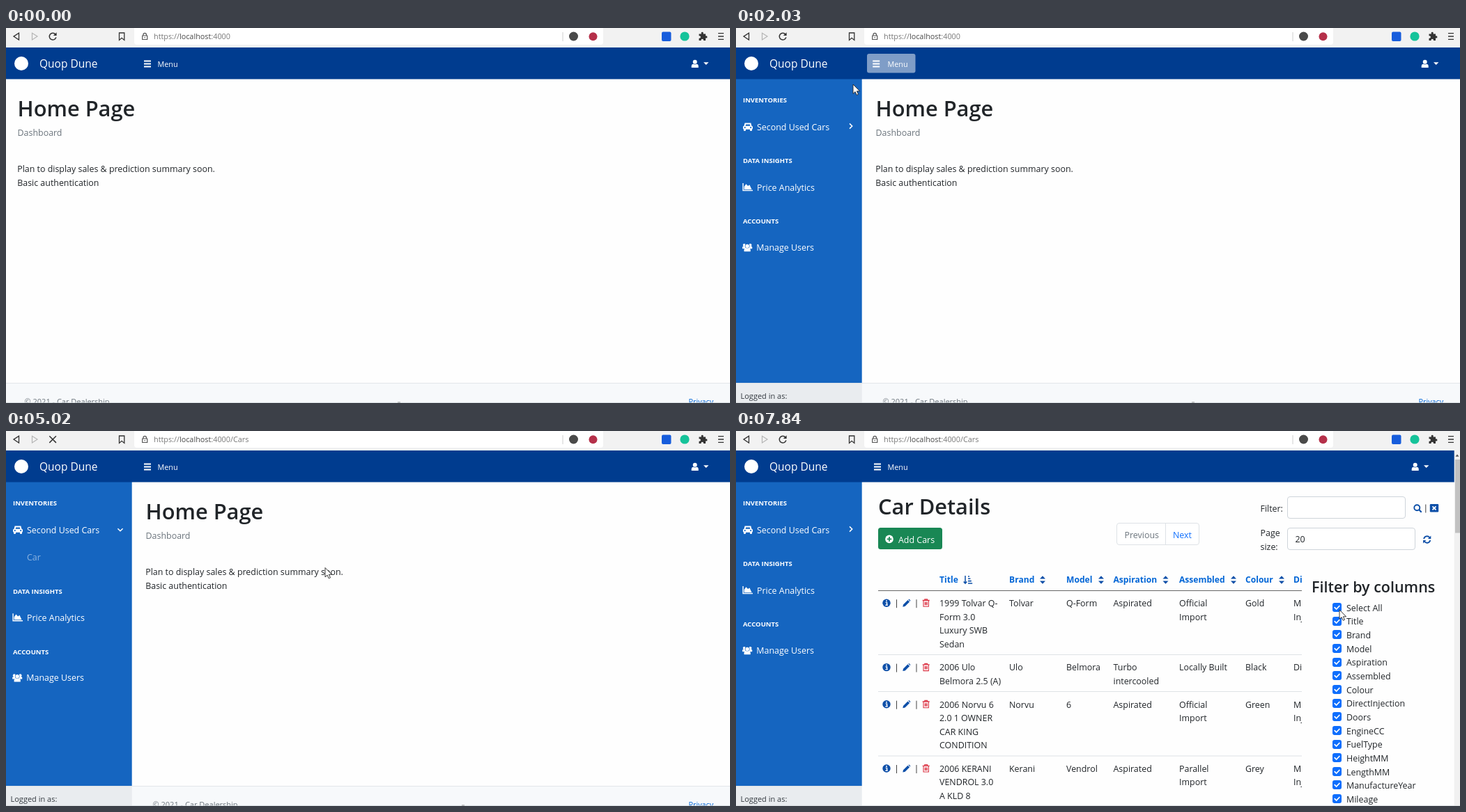
Write an HTML page that moves like this. It is 1039 by 539 pixels and loops after 8 s.

```html
<!DOCTYPE html>
<html lang="en">
<head>
<meta charset="utf-8">
<title>Car dealership dashboard</title>
<style>
html, body { margin: 0; width: 100%; height: 100%; overflow: hidden; background: #fefefe; }
svg { display: block; width: 1039px; height: 539px; font: 12.43px "Open Sans", "Noto Sans", sans-serif; }
text { white-space: pre; }
.off { display: none; }
.bare .fa { visibility: hidden; }
.dim { opacity: .5; }
</style>
</head>
<body>
<svg id="stage" viewBox="0 0 1039 539" xmlns="http://www.w3.org/2000/svg"></svg>
<script>
const INK = '#212529', GREY = '#6c757d', NAVY = '#003c8f', BLUE = '#1565c0',
  LINK = '#0366d6', ICON = '#0d4fa8', RED = '#dc3545', BODY = 12.43;

// Drawing helpers, all returning markup
const text = (x, y, s, fill = INK, size = BODY, weight = 400) =>
  `<text x="${x}" y="${y}" fill="${fill}" font-size="${size}" font-weight="${weight}">${s.replace(/&/g, '&amp;')}</text>`;
const rect = (x, y, w, h, fill, r = 0, stroke = 'none') =>
  `<rect x="${x}" y="${y}" width="${w}" height="${h}" rx="${r}" fill="${fill}" stroke="${stroke}"/>`;
const circle = (x, y, r, fill) => `<circle cx="${x}" cy="${y}" r="${r}" fill="${fill}"/>`;
const fill = (d, c) => `<path d="${d}" fill="${c}"/>`;
const line = (d, c, w = 1, extra = '') => `<path d="${d}" fill="none" stroke="${c}" stroke-width="${w}" ${extra}/>`;
const group = (attrs, ...parts) => `<g ${attrs}>${parts.join('')}</g>`;
const icon = (x, y, ...parts) => group(`class="fa" transform="translate(${x} ${y})"`, ...parts);
const pointer = d => `<path d="${d}" fill="#fff" stroke="#222" stroke-width=".9"/>`;

// Icons, centred on the given point
const bars = (x, y) => icon(x, y, line('M-5-4H5M-5 0H5M-5 4H5', '#fff', 1.8));
const user = (x, y) => icon(x, y, circle(0, -2.7, 3, '#fff'),
  fill('M-5 5.5V3.5Q-5 .3-2 .3Q0 1.6 2 .3Q5 .3 5 3.5V5.5Z', '#fff'));
const carIcon = (x, y) => icon(x, y,
  line('M-4.6-.5L-3.6-4.4H3.6L4.6-.5', '#fff', 2),
  rect(-7, -1.3, 14, 5, '#fff', 1.6), rect(-6, 2, 3, 4, '#fff', 1), rect(3, 2, 3, 4, '#fff', 1),
  circle(-4.2, 1.1, 1.1, BLUE), circle(4.2, 1.1, 1.1, BLUE));
const chart = (x, y) => icon(x, y, line('M-6.4-5.5V5H7.5', '#fff', 1.4),
  fill('M-4.8 3.4V-.5L-2-4.2L.6-1.4L3-3L6 3.4Z', '#fff'));
const people = (x, y) => icon(x, y, circle(-4.3, -3.2, 2, '#fff'), circle(4.3, -3.2, 2, '#fff'),
  fill('M-7 2V0Q-7-1.6-5-1.6H5Q7-1.6 7 0V2Z', '#fff'),
  circle(0, -1.8, 3.3, BLUE), circle(0, -1.8, 2.7, '#fff'),
  fill('M-4.6 6V4Q-4.6 1.2-2 1.2H2Q4.6 1.2 4.6 4V6Z', '#fff'));
const info = (x, y) => icon(x, y, circle(0, 0, 5.7, ICON), line('M-1.4-.6H.6V3M-1.6 3H1.8', '#fff', 1.4), circle(0, -3, 1, '#fff'));
const pencil = (x, y) => icon(x, y, fill('M-5.5 5.5L-4.8 2.2L1.7-4.3L4.3-1.7L-2.2 4.8ZM2.5-5L3.6-5.6L5.6-3.6L5-2.5Z', ICON));
const trash = (x, y) => icon(x, y, line('M-5-3.7H5M-1.8-4V-5.3H1.8V-4', RED, 1.3),
  line('M-3.7-3.5V5H3.7V-3.5M-1.5-1.5V3M0-1.5V3M1.5-1.5V3', RED, 1.1));
const sorter = (x, y) => icon(x, y, fill('M-4-1.5H4L0-5.8ZM-4 1.5H4L0 5.8Z', ICON));
const sorted = (x, y) => icon(x, y, line('M-4-6V5M-6.3 2.4L-4 5L-1.7 2.4', ICON, 1.5),
  line('M0-5H2M0-1.8H3.4M0 1.6H4.8M0 5H6.2', ICON, 1.6));
const refresh = (x, y) => icon(x, y, line('M-4.6-1A4.7 4.7 0 0 1 3.6-3M4.6 1A4.7 4.7 0 0 1-3.6 3', ICON, 1.8),
  fill('M5.6-5.4V-1H1.2ZM-5.6 5.4V1H-1.2Z', ICON));
const check = (x, y) => rect(x - 6.5, y - 6.5, 13, 13, '#0d6efd', 3) +
  line(`M${x - 3.3} ${y + .2}l2.4 2.4l4.3-4.6`, '#fff', 1.7, 'stroke-linecap="round"');

function browser() {
  const bar = '#333';
  return rect(0, 0, 1039, 28, '#f2f2f2') + rect(184, -6, 673, 30, '#fff', 4) +
    line('M18.5 7.3V17L11 12.1Z', bar, 1.3) + line('M37.5 7.3V17L45 12.1Z', '#b5b5b5', 1.2) +
    group('id="reload"', line('M71 9A4.9 4.9 0 1 0 71.9 13.4', bar, 1.5), fill('M72.6 6.3V11H67.9Z', bar)) +
    group('id="stop"', line('M62.3 7.3L71.9 16.9M71.9 7.3L62.3 16.9', bar, 1.5)) +
    line('M162.5 7H169.8V17.4L166.1 14.3L162.5 17.4Z', bar, 1.3) +
    line('M195.7 11H202.7V16.5H195.7ZM197 11V9.5Q197 7.4 199.2 7.4Q201.4 7.4 201.4 9.5V11', '#555', 1.2) + circle(199.2, 13.8, .8, '#555') +
    `<text x="212" y="16.4" font-size="10.84" fill="#777">https://<tspan fill="#484848">localhost</tspan>:4000<tspan id="path">/Cars</tspan></text>` +
    line('M799 6V19', '#d0d0d0') + circle(814.5, 12, 6.5, '#4a4a4a') + circle(842.5, 12.3, 6, '#b5304a') +
    rect(941, 5.5, 13.5, 13.5, '#175ddc', 2) + circle(974, 12, 6.6, '#15c39a') +
    fill('M994.5 8.5H998Q997 5.8 999.2 5.8Q1001.4 5.8 1000.5 8.5H1004V11.5Q1006.4 10.7 1006.4 12.9Q1006.4 15 1004 14.2V18H1001Q1001.3 15.8 999.2 15.8Q997.2 15.8 997.5 18H994.5V14.8Q997 15 997 13Q997 11 994.5 11.3Z', bar) +
    line('M1022 7.6H1030M1022 12H1030M1022 16.4H1030', bar, 1.3);
}

function navbar() {
  return rect(0, 28, 1039, 45.5, NAVY) + circle(22, 51, 10, '#fff') +
    text(48, 57.2, 'Quop Dune', '#fff', 15.5) +
    group('id="glow"', rect(188, 37, 69.5, 27.5, '#7f9dc7', 3)) +
    group('id="bars"', bars(203, 51.5)) + text(217.5, 55.7, 'Menu', '#fff', 10.8, 500) +
    group('id="account"', user(988.7, 51.5), fill('M1001 49.2H1008.4L1004.7 53Z', '#fff'));
}

function sidebar() {
  const head = (y, s) => text(10, y, s, '#fff', 9.5, 700);
  const item = (y, s, x = 30) => text(x, y, s, '#fff', BODY, 500);
  return rect(0, 73, 180.7, 437, BLUE) + rect(0, 510, 180.7, 29, '#e9ecef') +
    line('M0 510.5H180.7', '#dfe3e6') + text(6.5, 533, 'Logged in as:', '#343a40', 11) +
    head(107.4, 'INVENTORIES') + carIcon(17, 142) +
    group('id="used"', item(146.6, 'Second Used Cars')) +
    group('id="right"', icon(165, 141, line('M-2-3.6L1.7 0L-2 3.6', '#fff', 1.5))) +
    group('id="down"', icon(164, 142, line('M-3.6-1.8L0 1.8L3.6-1.8', '#fff', 1.5))) +
    group('id="car"', item(185.8, 'Car')) +
    group('id="lower"', head(194.4, 'DATA INSIGHTS'), chart(16.5, 228.5), item(233.5, 'Price Analytics'),
      head(281.4, 'ACCOUNTS'), people(16.2, 315.2), item(320.2, 'Manage Users', 29.3));
}

function home() {
  return rect(-184, 510, 1230, 29, '#f7f9fb') + line('M-184 510.5H1046', '#e3e6e9') +
    text(16.5, 127, 'Home Page', INK, 30.8, 600) + text(16.5, 154.6, 'Dashboard', GREY) +
    text(16.2, 207, 'Plan to display sales & prediction summary soon.') + text(16.2, 226.8, 'Basic authentication') +
    text(26.5, 541.3, '© 2021 - Car Dealership', GREY, 11);
}

const STEP = 19.65;
const ROWS = [
  [252, ['1999 Tolvar Q-', 'Form 3.0', 'Luxury SWB', 'Sedan'], 'Tolvar', 'Q-Form', ['Aspirated'], ['Official', 'Import'], 'Gold', ['M', 'Inj']],
  [344.4, ['2006 Ulo', 'Belmora 2.5 (A)'], 'Ulo', 'Belmora', ['Turbo', 'intercooled'], ['Locally Built'], 'Black', ['Direct']],
  [397.5, ['2006 Norvu 6', '2.0 1 OWNER', 'CAR KING', 'CONDITION'], 'Norvu', '6', ['Aspirated'], ['Official', 'Import'], 'Green', ['M', 'Inj']],
  [489.8, ['2006 KERANI', 'VENDROL 3.0', 'A KLD 8'], 'Kerani', 'Vendrol', ['Aspirated'], ['Parallel', 'Import'], 'Grey', ['M', 'Inj']]
];
const COLS = [292, 392, 474, 541.5, 636, 731, 800];
const HEADS = ['Title', 'Brand', 'Model', 'Aspiration', 'Assembled', 'Colour', 'Direct'];
const SORTERS = [0, 440, 524, 616.5, 714, 783];
const FIELDS = ['Select All', 'Title', 'Brand', 'Model', 'Aspiration', 'Assembled', 'Colour', 'DirectInjection', 'Doors',
  'EngineCC', 'FuelType', 'HeightMM', 'LengthMM', 'ManufactureYear', 'Mileage'];

function table() {
  const heads = HEADS.map((h, i) => text(COLS[i], 218.4, h, LINK, 12.1, 700) +
    (SORTERS[i] ? sorter(SORTERS[i], 214) : '')).join('') + sorted(333, 214);
  const rows = ROWS.map(([y, ...cells]) => {
    const c = y - 4.8;
    return info(216, c) + pencil(244.8, c) + trash(272.7, c) +
      line(`M230.5 ${c - 5}v12M259 ${c - 5}v12`, '#444', 1) +
      cells.map((cell, i) => [].concat(cell).map((s, k) => text(COLS[i], y + k * STEP, s)).join('')).join('');
  }).join('');
  return group('clip-path="url(#tableClip)"', heads, rows,
    line('M204 229.5H812', '#666'), line('M204 321.5H812M204 374.5H812M204 467H812', '#dee2e6'));
}

function cars() {
  return rect(180, 73, 851, 466, '#fefefe') + text(204, 120.2, 'Car Details', INK, 30.8, 600) +
    rect(204, 139, 92, 31, '#198754', 3.5) +
    icon(220, 155.4, circle(0, 0, 5.8, '#fff'), line('M-3.3 0H3.3M0-3.3V3.3', '#198754', 1.7)) +
    text(233, 160.5, 'Add Cars', '#fff') +
    rect(546.5, 132.5, 118, 31, '#fff', 3.5, '#dee2e6') + line('M616.5 133V163', '#dee2e6') +
    text(557.5, 154.4, 'Previous', GREY) + text(627, 154.4, 'Next', '#0d6efd') +
    text(752.5, 115.6, 'Filter:') + rect(791.5, 94.5, 169, 31, '#fff', 3.5, '#ced4da') +
    icon(977.3, 110.3, `<circle r="4" fill="none" stroke="${ICON}" stroke-width="1.9"/>`, line('M2.8 2.8L6.4 6.4', ICON, 2.1)) +
    line('M989.8 105.5V117.5', '#444') +
    icon(1002, 110.8, rect(-6.2, -5.7, 12.4, 11.4, ICON, 1.2), line('M-2.5-2.5L2.5 2.5M2.5-2.5L-2.5 2.5', '#fff', 1.8)) +
    text(752.5, 151.2, 'Page') + text(752.5, 170.8, 'size:') +
    rect(791.5, 139.5, 183, 31, '#fff', 3.5, '#ced4da') + text(802.5, 160.4, '20') + refresh(991.7, 156) +
    table() + text(826, 232.4, 'Filter by columns', INK, 21.5, 600) +
    FIELDS.map((f, i) => check(862.5, Math.round(253 + i * STEP) + .5) + text(876, 258.8 + i * STEP, f)).join('');
}

const scrollbar = () => rect(1030.7, 28, 8.3, 511, '#f1f1f1') + rect(1032, 41, 7, 105.5, '#c1c1c1') +
  fill('M1032.5 36.8H1037.5L1035 33.6Z', '#555');

const stage = document.getElementById('stage');
stage.innerHTML =
  '<defs><clipPath id="tableClip"><rect x="204" y="200" width="608" height="339"/></clipPath></defs>' +
  rect(0, 0, 1039, 539, '#fefefe') +
  group('id="home"', home()) +
  group('id="foot"', text(979.5, 541.3, 'Privacy', LINK, 10.8), group('id="speck"', rect(562, 537.6, 4, 1.4, '#777'))) +
  group('id="cars"', cars()) + group('id="side"', sidebar()) +
  browser() + navbar() + group('id="scroll"', scrollbar()) +
  line('M0 538.6H1039', '#cfd5d9', .8) +
  group('id="arrow"', pointer('M0 0V13.4L3.1 10.6L5.2 15.3L7.5 14.3L5.4 9.8H9.6Z')) +
  group('id="hand"', pointer('M-1.4 1.2Q0-.6 1.4 1.2V5.4Q2.8 4.6 3.8 5.8Q5.2 5.2 6 6.6Q7.6 6.2 7.8 8V11.4Q7.8 13.4 6.4 16.2H-1.2Q-2.4 13.4-5 10.4Q-5.2 8.2-3.2 8.8L-1.4 10.4Z'));
const $ = Object.fromEntries([...stage.querySelectorAll('g[id], tspan[id]')].map(e => [e.id, e]));

// Each step keeps the values of the one before unless it sets them
const STEPS = [
  [0, { x: -50, y: 0, hand: 0, side: -184, drop: 0, glow: 0, used: 0, car: 0, load: 0, path: 0, cars: 0, bare: 0 }],
  [400, { x: 563, y: 316 }], [600, { x: 520, y: 282 }], [810, { x: 432, y: 216 }],
  [1010, { x: 338, y: 146 }], [1220, { x: 262, y: 92 }], [1420, { x: 225, y: 69 }],
  [1620, { x: 222, y: 58, hand: 1, glow: 1 }], [1810, { side: -141 }],
  [2030, { x: 168, y: 81, hand: 0, side: 0 }], [2210, { x: 165, y: 104, glow: 0 }],
  [2410, { x: 165, y: 128 }], [2620, { x: 166, y: 143, hand: 1 }],
  [2830, { used: 1 }], [3030, { drop: 15.2 }], [3230, { drop: 39.3 }],
  [3430, { x: 138, y: 152, hand: 0, used: 0 }], [3640, { x: 78, y: 168 }], [3850, { x: 40, y: 178, hand: 1, car: 1 }],
  [4240, { load: 1, path: 1 }], [4440, { x: 92, y: 181, hand: 0 }], [4640, { x: 222, y: 187 }],
  [4840, { x: 372, y: 193 }], [5020, { x: 458, y: 196.5 }],
  [5220, { x: 459, y: 190, drop: 0, car: 0, cars: 1, bare: 1 }],
  [5420, { y: 186.5, load: 0, bare: 0 }], [5640, { x: 452, y: 181 }], [5840, { x: 432, y: 172 }],
  [6040, { x: 405, y: 161 }], [6260, { x: 382, y: 153 }], [6460, { x: 372, y: 150 }],
  [6840, { x: 415, y: 158 }], [7040, { x: 520, y: 180 }], [7240, { x: 660, y: 211 }],
  [7440, { x: 780, y: 238 }], [7640, { x: 848, y: 253 }], [7840, { x: 866, y: 257 }]
];
const states = [];
for (const [at, change] of STEPS) states.push({ ...states[states.length - 1], ...change, at });

const show = (el, on) => el.classList.toggle('off', !on);
const move = (el, x, y) => el.setAttribute('transform', `translate(${x} ${y})`);

function draw(s) {
  move($.home, 184 + s.side, 0);
  move($.speck, (184 + s.side) / 2, 0);
  move($.side, s.side, 0);
  move($.lower, 0, s.drop);
  move($.account, s.cars ? -14 : 0, 0);
  move($.bars, s.glow ? -1.8 : 0, 0);
  show($.glow, s.glow);
  show($.right, !s.drop);
  show($.down, s.drop);
  show($.car, s.drop > 30);
  $.used.classList.toggle('dim', s.used);
  $.car.classList.toggle('dim', s.car);
  show($.reload, !s.load);
  show($.stop, s.load);
  show($.path, s.path);
  show($.cars, s.cars);
  show($.scroll, s.cars);
  show($.foot, !s.cars);
  stage.classList.toggle('bare', s.bare);
  show($.arrow, !s.hand);
  show($.hand, s.hand);
  move($.arrow, s.x, s.y);
  move($.hand, s.x, s.y);
}

const start = performance.now();
let current;
function tick() {
  const t = (performance.now() - start) % 8000;
  const s = states.findLast(step => step.at <= t);
  if (s !== current) draw(current = s);
  requestAnimationFrame(tick);
}
tick();
</script>
</body>
</html>
```
